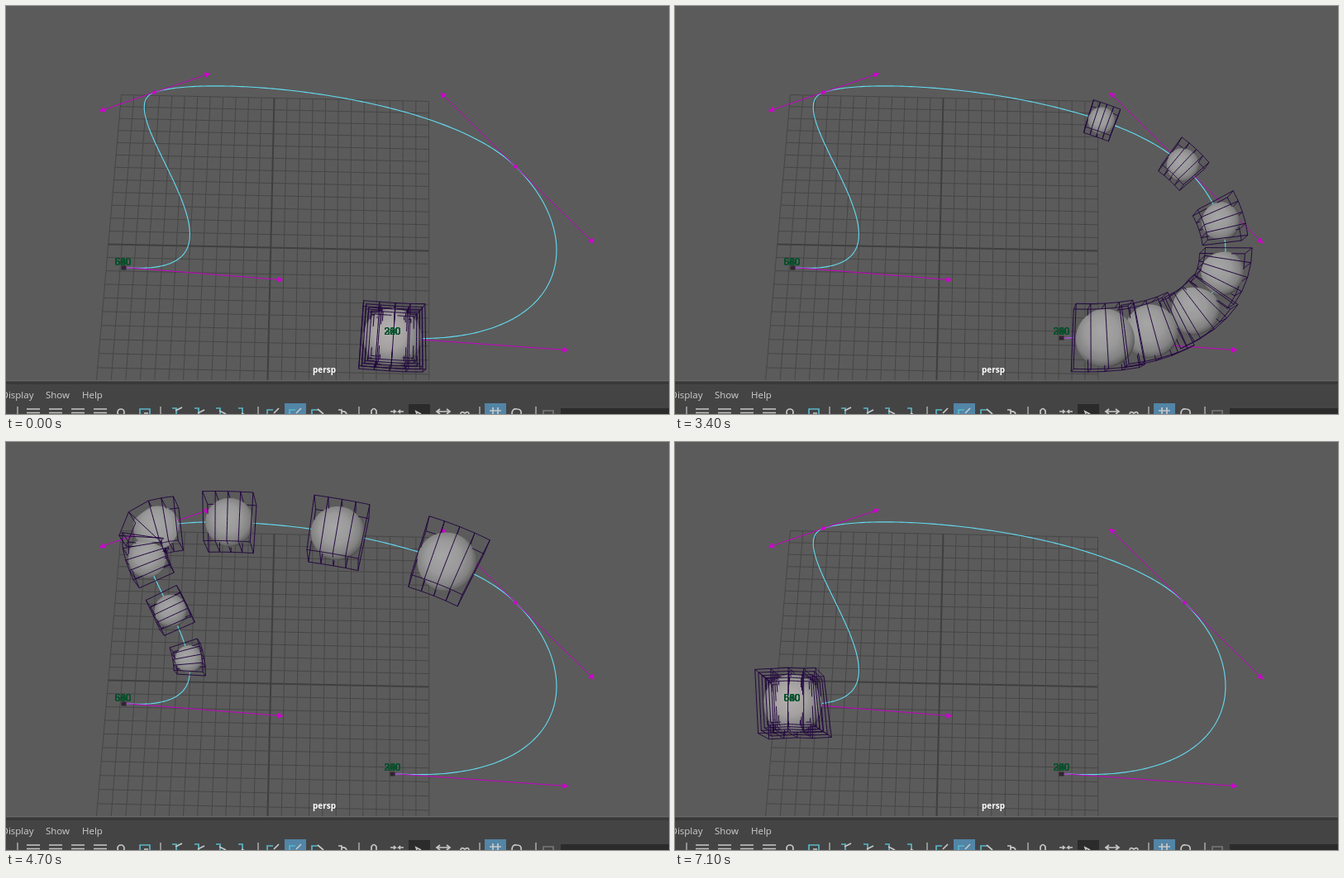
Write an HTML page with a canvas that moves like this. It is 802 px wide and 494 px high and loops after 7200 ms.

```html
<!DOCTYPE html>
<html lang="en">
<head>
<meta charset="utf-8">
<title>Motion path</title>
<style>
  html, body { margin: 0; width: 100%; height: 100%; overflow: hidden; background: #5b5b5b; }
  canvas, svg { position: absolute; left: 0; top: 0; width: 802px; height: 494px; display: block; }
  .menu { font: 11.5px "Open Sans", "Noto Sans", sans-serif; fill: #cfcfcf; }
  .camera { font: bold 10px "Open Sans", "Noto Sans", sans-serif; fill: #fff; text-anchor: middle; }
  .keys { font: 12px "Liberation Sans", Arial, sans-serif; fill: #06502b; text-anchor: middle; }
</style>
</head>
<body>
<canvas id="view" width="802" height="494"></canvas>
<svg viewBox="0 0 802 494">
  <g class="keys" id="keys"></g>
  <text class="camera" x="385" y="444">persp</text>
  <rect y="453" width="802" height="41" fill="#444"/>
  <rect y="453" width="802" height="1.5" fill="#686868"/>
  <rect y="454.5" width="802" height="3.5" fill="#393939"/>
  <g class="menu">
    <text x="-5.5" y="475">Display</text>
    <text x="48" y="475">Show</text>
    <text x="92" y="475">Help</text>
  </g>
  <rect x="337" y="481" width="26" height="13" fill="#5285a6"/>
  <rect x="579" y="481" width="26" height="13" fill="#5285a6"/>
  <rect x="487" y="482" width="26" height="12" fill="#2b2b2b"/>
  <rect x="671" y="487" width="131" height="7" fill="#2b2b2b"/>
  <g id="icons" fill="none" stroke="#c8c8c8" stroke-width="1.7">
    <circle cx="139" cy="492" r="4"/>
    <path d="M402 489h4v5M406 491q5 -1 6 3M442 494v-4q3 -5 6 0v4"/>
    <path d="M465 491h6l-2 -2m2 2l-2 2M481 491h-6l2 -2m-2 2l2 2"/>
    <path d="M497 494l-1 -3l6 3"/>
    <path d="M521 491h16M525 488l-4 3l4 3M533 488l4 3l-4 3"/>
    <path d="M550 494q0 -4 5 -1q5 -3 5 1"/>
    <path d="M585 490h14M589 486v8M595 486v8"/>
    <path d="M612 494q0 -7 6 -6q6 0 5 6"/>
    <path d="M650 494v-4h12v4" stroke="#777"/>
    <path d="M162 494v-6h12v6M316 494v-5h7M343 494v-5h7M370 494v-5h7" stroke="#59b7c9"/>
    <path d="M167 493h5M324 493l6 -6M351 493l6 -6M377 488l7 6"/>
  </g>
</svg>
<script>
const g = document.getElementById('view').getContext('2d');
const LOOP = 7200, STEP = 100, COUNT = 7, LAG = 0.057;
const SAMPLES = 120, SECTIONS = 4;
const EYE = { x: 415, y: 520, k: 0.0006 };

// anchors and handles of the path, in travel order
const KNOTS = [
  [467, 401], [677, 416], [709, 285], [616, 194], [527, 106],
  [244, 82], [179, 104], [115, 126], [332, 331], [142, 316]
];
// time in ms, progress of the leading ball
const PLAYHEAD = [[1780, 0], [3400, 0.446], [4200, 0.661], [4700, 0.78], [5500, 0.97], [7100, 1.342]];

const mix = (a, b, t) => a + (b - a) * t;
const clamp = v => Math.min(1, Math.max(0, v));

function bezier(seg, t) {
  const [a, b, c, d] = KNOTS.slice(seg * 3, seg * 3 + 4), q = 1 - t;
  return [0, 1].map(i => a[i] * q ** 3 + 3 * b[i] * q * q * t + 3 * c[i] * q * t * t + d[i] * t ** 3);
}

const path = [], dist = [0];
for (let i = 0; i <= 3 * SAMPLES; i++) {
  const seg = Math.min(2, Math.floor(i / SAMPLES));
  path.push(bezier(seg, i / SAMPLES - seg));
  if (i) dist.push(dist[i - 1] + Math.hypot(path[i][0] - path[i - 1][0], path[i][1] - path[i - 1][1]));
}
const LENGTH = dist[dist.length - 1];

function lengthAt(u) {
  const i = Math.min(3 * SAMPLES - 1, Math.floor(u * SAMPLES));
  return mix(dist[i], dist[i + 1], u * SAMPLES - i);
}

// position on the path, continued straight past both ends
function along(s) {
  if (s < 0) return [467 + s * 0.9975, 401 + s * 0.071];
  if (s > LENGTH) return [142 - (s - LENGTH), 316 + (s - LENGTH) * 0.05];
  let lo = 0, hi = dist.length - 1;
  while (hi - lo > 1) {
    const m = (lo + hi) >> 1;
    if (dist[m] <= s) lo = m; else hi = m;
  }
  const t = (s - dist[lo]) / (dist[hi] - dist[lo]);
  return [mix(path[lo][0], path[hi][0], t), mix(path[lo][1], path[hi][1], t)];
}

// cross-section of the path: centre and sideways unit vector
function section(s) {
  const [x, y] = along(s), p0 = along(s - 2), p1 = along(s + 2);
  const dx = p1[0] - p0[0], dy = p1[1] - p0[1], l = Math.hypot(dx, dy) || 1;
  return [x, y, -dy / l, dx / l];
}

function makeBall(i, head) {
  const x = clamp(head - LAG * i);
  const s = lengthAt(3 * x * x * (3 - 2 * x));
  const [px, py] = along(s);
  const r = 16.5 + 3.17 * i;
  const size = r * (1 + (py - 360) * 0.00025);
  const cuts = Array.from({ length: SECTIONS + 1 }, (_, k) => section(s + 1.06 * size * (2 * k / SECTIONS - 1)));
  return { x: px, y: py, r, size, cuts, rest: x === 0 || x === 1 };
}

// a: along the path, b: sideways, z: height; straight between cross-sections
function project(ball, a, b, z) {
  const f = (a / (1.06 * ball.size) + 1) * SECTIONS / 2;
  const k = Math.min(SECTIONS - 1, Math.max(0, Math.floor(f)));
  const [cx, cy, nx, ny] = ball.cuts[k].map((v, i) => mix(v, ball.cuts[k + 1][i], f - k));
  const x = cx + nx * b, y = cy + ny * b;
  return { x: x + (x - EYE.x) * EYE.k * z, y: y + (y - EYE.y) * EYE.k * z, z };
}

function line(x1, y1, x2, y2, color, width = 1) {
  g.strokeStyle = color;
  g.lineWidth = width;
  g.beginPath();
  g.moveTo(x1, y1);
  g.lineTo(x2, y2);
  g.stroke();
}

function drawGrid() {
  for (let i = -12; i <= 12; i++) {
    const v = i + 12, y = 107 + 14.2 * v + 0.073 * v * v;
    const color = i ? '#464646' : '#3f3f3f', width = i ? 1 : 2;
    line(139 - 33 * (y - 107) / 383, y, 511, y + 8, color, width);
    line(324 + 15.5 * i + 0.007 * i * i, 111 + i / 3, 315 + 16.9 * i - 0.045 * i * i, 494 + i / 3, color, width);
  }
}

function drawHandle(from, to) {
  const [x, y] = to, a = Math.atan2(y - from[1], x - from[0]);
  line(from[0], from[1], x, y, '#c800c8');
  g.save();
  g.translate(x, y);
  g.rotate(a);
  g.fillStyle = '#d000d0';
  g.beginPath();
  g.moveTo(3, 0);
  g.lineTo(-4, -3.5);
  g.lineTo(-4, 3.5);
  g.fill();
  g.restore();
}

function drawPath() {
  g.strokeStyle = '#62dcf2';
  g.lineWidth = 1.1;
  g.beginPath();
  path.forEach(p => g.lineTo(p[0], p[1]));
  g.stroke();
  [[0, 1], [3, 2], [3, 4], [6, 5], [6, 7], [9, 8]].forEach(([a, b]) => drawHandle(KNOTS[a], KNOTS[b]));
  g.fillStyle = '#d000d0';
  [3, 6].forEach(i => g.fillRect(KNOTS[i][0] - 2, KNOTS[i][1] - 2, 4, 4));
  g.fillStyle = '#30252f';
  [0, 9].forEach(i => g.fillRect(KNOTS[i][0] - 3, KNOTS[i][1] - 2, 6, 5));
}

function drawBall(ball) {
  const rim = Array.from({ length: 48 }, (_, i) => {
    const a = i / 48 * 2 * Math.PI;
    return project(ball, ball.r * Math.cos(a), ball.r * Math.sin(a), 0);
  });
  const cx = rim.reduce((n, p) => n + p.x, 0) / 48, cy = rim.reduce((n, p) => n + p.y, 0) / 48;
  const size = Math.max(...rim.map(p => Math.hypot(p.x - cx, p.y - cy)));
  const fill = g.createRadialGradient(cx - size * 0.15, cy - size * 0.25, 0, cx - size * 0.06, cy - size * 0.1, size * 1.12);
  fill.addColorStop(0, ball.rest ? '#b6b1b1' : '#a6a6a6');
  fill.addColorStop(0.5, ball.rest ? '#a5a1a1' : '#9a9a9a');
  fill.addColorStop(0.8, '#828282');
  fill.addColorStop(0.93, '#666');
  fill.addColorStop(1, '#3c3c3c');
  g.fillStyle = fill;
  g.beginPath();
  rim.forEach(p => g.lineTo(p.x, p.y));
  g.fill();
}

function hidden(p, balls) {
  return balls.some(b => {
    const d2 = (p.x - b.x) ** 2 + (p.y - b.y) ** 2, r2 = b.r * b.r;
    return d2 < r2 && p.z < Math.sqrt(r2 - d2);
  });
}

// wire edge between two lattice corners, cut where a ball covers it
function drawEdge(ball, from, to, balls) {
  const n = 10, p0 = project(ball, ...from), p1 = project(ball, ...to);
  const at = t => ({ x: mix(p0.x, p1.x, t), y: mix(p0.y, p1.y, t), z: mix(p0.z, p1.z, t) });
  let open = false;
  for (let i = 0; i < n; i++) {
    const a = at(i / n), b = at((i + 1) / n);
    const clear = !hidden(at((i + 0.5) / n), balls);
    if (clear && !open) g.moveTo(a.x, a.y);
    if (clear) g.lineTo(b.x, b.y);
    open = clear;
  }
}

function drawLattice(ball, balls) {
  const A = ball.size * 1.06, B = ball.size * 1.08, Z = ball.r;
  const ring = [[-B, -Z], [B, -Z], [B, Z], [-B, Z]];
  g.strokeStyle = '#22063f';
  g.lineWidth = 1;
  g.beginPath();
  for (let i = 0; i <= SECTIONS; i++) {
    const a = A * (2 * i / SECTIONS - 1);
    ring.forEach((c, k) => {
      drawEdge(ball, [a, ...c], [a, ...ring[(k + 1) % 4]], balls);
      if (i < SECTIONS) drawEdge(ball, [a, ...c], [a + 2 * A / SECTIONS, ...c], balls);
    });
  }
  g.stroke();
}

function progress(t) {
  if (t <= PLAYHEAD[0][0]) return 0;
  for (let i = 1; i < PLAYHEAD.length; i++) {
    const [t0, v0] = PLAYHEAD[i - 1], [t1, v1] = PLAYHEAD[i];
    if (t <= t1) return mix(v0, v1, (t - t0) / (t1 - t0));
  }
  return PLAYHEAD[PLAYHEAD.length - 1][1];
}

function draw(t) {
  const head = progress(t);
  const balls = Array.from({ length: COUNT }, (_, i) => makeBall(i, head));
  g.setTransform(1, 0, 0, 1, 0, 0);
  g.fillStyle = '#5b5b5b';
  g.fillRect(0, 0, 802, 494);
  g.translate(0.5, 0.5);
  drawGrid();
  drawPath();
  balls.forEach(drawBall);
  balls.forEach(b => drawLattice(b, balls));
}

// stacked key numbers and toolbar details
const keys = [];
for (let i = 0; i < COUNT; i++) {
  keys.push(`<text x="467.5" y="398">${200 + 20 * i}</text><text x="141.5" y="314">${560 + 20 * i}</text>`);
}
document.getElementById('keys').innerHTML = keys.join('');

let marks = '';
[25, 52, 79, 106].forEach(x => { marks += `<path d="M${x} 488h16M${x} 492.5h16"/>`; });
[201, 228, 254, 281].forEach((x, i) => {
  marks += `<path d="M${x} 487h5v7" stroke="#59b7c9"/><path d="M${x + 4} ${i % 2 ? 493 : 490}l8 ${i > 1 ? 4 : -4}"/>`;
});
[14, 187, 305, 427, 573, 641].forEach(x => {
  marks += `<path d="M${x} 485v9" stroke="#a0a0a0"/>`;
});
document.getElementById('icons').insertAdjacentHTML('beforeend', marks);

let shown = -1;
function frame() {
  const t = Math.floor(performance.now() % LOOP / STEP) * STEP;
  if (t !== shown) draw(shown = t);
  requestAnimationFrame(frame);
}
frame();
</script>
</body>
</html>
```
